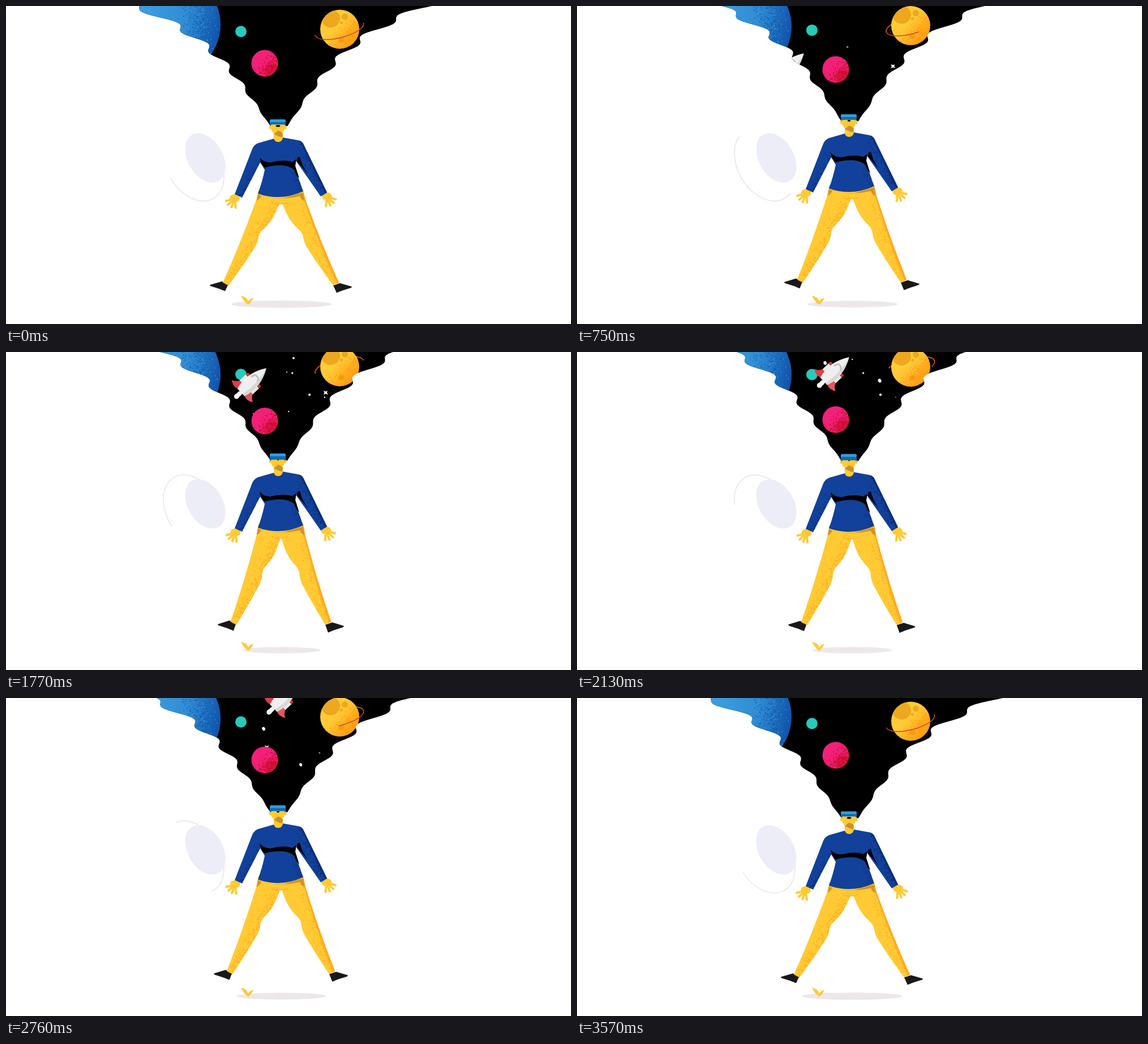
These frames come from a looping animation (998 by 561 pixels, 3600 ms). An HTML page with a canvas:

```html
<!DOCTYPE html>
<html lang="en">
<head>
<meta charset="utf-8">
<title>Space dreamer</title>
<style>
html, body { margin: 0; width: 100%; height: 100%; overflow: hidden; background: #fff; }
canvas { display: block; }
</style>
</head>
<body>
<canvas id="stage" width="998" height="561"></canvas>
<script>
const ctx = document.getElementById('stage').getContext('2d');
const LOOP = 3600, TAU = Math.PI * 2;
const SKIN = '#ffca33';

function random(seed) {
  return () => (seed = (seed * 16807) % 2147483647) / 2147483647;
}

function oval(x, y, rx, ry, color, turn = 0) {
  ctx.beginPath();
  ctx.ellipse(x, y, rx, ry, turn, 0, TAU);
  ctx.fillStyle = color;
  ctx.fill();
}

function shape(d, color) {
  ctx.fillStyle = color;
  ctx.fill(new Path2D(d));
}

function line(d, width, color) {
  ctx.lineWidth = width;
  ctx.strokeStyle = color;
  ctx.stroke(new Path2D(d));
}

// Run a drawing inside its own transform and clip
function group(paint) {
  ctx.save();
  paint();
  ctx.restore();
}

// Speckles scattered around a straight line
function grain(x0, y0, x1, y1, spread, count, color, seed = 7) {
  const rnd = random(seed);
  ctx.fillStyle = color;
  for (let i = 0; i < count; i++) {
    const k = rnd();
    ctx.fillRect(x0 + (x1 - x0) * k + (rnd() + rnd() - 1) * spread,
      y0 + (y1 - y0) * k + (rnd() + rnd() - 1) * spread, 1.6, 1.6);
  }
}

function gradient(x0, y0, x1, y1, ...stops) {
  const g = ctx.createLinearGradient(x0, y0, x1, y1);
  stops.forEach((c, i) => g.addColorStop(i / (stops.length - 1), c));
  return g;
}

function planet(x, y, r, fill, detail) {
  group(() => {
    ctx.translate(x, y);
    oval(0, 0, r, r, fill);
    ctx.clip();
    detail();
  });
}

// Half of an ellipse ending at angle lead, limited to the window low..high
function orbit(x, y, rx, ry, tilt, lead, low, high, color) {
  ctx.strokeStyle = color;
  ctx.lineWidth = 1.5;
  for (const turn of [-TAU, 0, TAU]) {
    const a = Math.max(low, lead - Math.PI + turn), b = Math.min(high, lead + turn);
    if (a >= b) continue;
    ctx.beginPath();
    ctx.ellipse(x, y, rx, ry, tilt, a, b);
    ctx.stroke();
  }
}

// Half width of the plume at height h above the head: a flare with growing waves
function flare(h, top, wavelength, phase) {
  const wave = 0.067 * h * Math.sin(TAU * (h / wavelength - phase));
  return 0.67 * h + top * (h / 212) ** 4 + wave;
}

function plume(u, loops) {
  const base = 212 - 20.5 * u;
  ctx.beginPath();
  for (let h = 240; h >= 0; h -= 3)
    ctx.lineTo(467 - flare(h, 97, 36, 0.306 + 2 * loops), base - h);
  for (let h = 0; h <= 240; h += 3)
    ctx.lineTo(497 + flare(h, 104, 37.5, 0.537 - 0.27 * u), base - h);
  ctx.closePath();
}

function drawStars(t) {
  const rnd = random(4242);
  for (let i = 0; i < 30; i++) {
    const x = 400 + 165 * rnd(), y = 5 + 125 * rnd(), r = 1 + 2 * rnd() ** 2;
    const from = 350 + 2300 * rnd(), to = from + 500 + 430 * rnd();
    if (t < from || t > to) continue;
    ctx.globalAlpha = Math.min(1, (t - from) / 90, (to - t) / 90);
    if (i % 7) oval(x, y, r, r > 2.3 ? r * 1.25 : r, '#fff', -0.4);
    else shape(`M${x - 4} ${y - 3}l4 1.5 3-1.5-1 3.5 2 3.5-4-1.5-4 1.5 1.5-3.5Z`, '#fff');
  }
  ctx.globalAlpha = 1;
}

function drawRocket(t) {
  group(() => {
    ctx.translate(433 + 0.058 * (t - 1770), 54 - 0.054 * (t - 1770));
    ctx.rotate(-0.76);
    oval(-35, 0, 5, 4.5, '#fff');
    oval(-29, 0, 7, 4, '#f4f4f4');
    for (const side of [-1, 1]) group(() => {
      ctx.scale(1, side);
      shape('M-4 14Q-18 17-22 27Q-29 16-24 8L-14 9Z', side < 0 ? '#dd3d45' : '#e2585a');
      shape('M-12 11H3V17H-12Z', '#e9e9e9');
      shape('M3 11H7Q10 14 7 17H3Z', '#d92f3c');
    });
    shape('M-25-9Q6-19 37 0Q6 19-25 9Z', '#efefef');
    shape('M-25 4Q8 10 37 0Q6 19-25 9Z', '#d8d8d8');
    line('M8-7Q16-6 15 0Q14 5 10 6', 3, '#c2c2c4');
  });
}

function drawSpace(t, u) {
  const loops = t / LOOP, spin = TAU * loops;
  group(() => {
    plume(u, loops);
    ctx.fillStyle = '#000';
    ctx.fill();
    ctx.clip();
    drawStars(t);

    planet(290, 33 + 7 * u, 89, gradient(-40, 0, 89, 25, '#3b9cde', '#2f8bd3', '#0d50a8'), () => {
      grain(45, -60, 65, 70, 40, 400, '#1159ae');
      grain(20, -40, 58, 40, 50, 180, '#3c98da', 31);
    });
    planet(415, 45 - 5.5 * u, 10, '#26cbbb', () => {});
    const bob = 20.5 * (u + 0.11 * Math.sin(spin));
    planet(457, 101 + bob, 23.5, '#f3207a', () => {
      oval(17, 17, 16, 16, '#e0164f');
      grain(-6, 24, 24, -6, 19, 330, '#c90d2c');
    });

    const y = 41 - 15 * u;
    const ring = (low, high) =>
      orbit(589, y, 44, 15, -0.25, spin + Math.PI, low, high, '#cf4a33');
    ring(-Math.PI, 0);
    ring(Math.PI, TAU);
    planet(589.5, y, 34.5, gradient(-5, -8, 28, 24, '#ffcb38', '#ffb423', '#ff980c'), () => {
      grain(-5, 34, 32, -10, 17, 190, '#ff9d14');
      oval(-16, -19, 16.5, 16, '#eda81f');
      oval(9, -22, 5.5, 5.5, '#eda81f');
      oval(3, -12, 2.5, 2.5, '#eda81f');
      oval(3, 19, 5, 5, '#f59a18');
    });
    ring(0, Math.PI);
    drawRocket(t);
  });
}

const leg = new Path2D('M446 326L441 345Q412 424 383 488L393 493Q421 455 440 425' +
  'Q445 416 446 408Q447 401 453 395Q467 383 475 367L483 349H487V326Z');

function drawLegs(u) {
  for (const side of [1, -1]) group(() => {
    // the hip rides with the body while the foot swings inwards
    const swing = 13.5 * u / 157, lift = 9 * u / 157;
    if (side < 0) ctx.transform(-1, 0, 0, 1, 971, 0);
    ctx.transform(1, 0, swing, 1 + lift, -331 * swing, -21 * u - 331 * lift);
    group(() => {
      if (side < 0) ctx.translate(0, 3);
      shape('M360 492L381 486L393 490L387 503L377 499L361 494Z', '#191919');
    });
    ctx.fillStyle = SKIN;
    ctx.fill(leg);
    ctx.clip(leg);
    if (side > 0) {
      grain(484, 350, 446, 405, 18, 220, '#ffab22');
      grain(446, 405, 392, 492, 15, 200, '#ffab22', 11);
    } else {
      line('M444 330Q412 424 383 488', 9, '#ffab22');
      grain(440, 345, 383, 488, 20, 330, '#ffab22');
    }
  });
}

function drawHand(x, y, side) {
  group(() => {
    ctx.translate(x, y);
    ctx.scale(side, 1);
    oval(0, -1, 9, 7, SKIN);
    for (let i = 0; i < 4; i++) {
      const a = 2.9 - 0.48 * i;
      line(`M0 0L${16 * Math.cos(a)} ${16 * Math.sin(a)}`, 4, SKIN);
    }
  });
}

const shirt = new Path2D('M473 234L445 242Q438 245 435 252L404 332L417 338L449 276' +
  'L457 289Q453 309 445 331Q485 345 525 327L510 285L512 273L556 336L567 329' +
  'L525 243Q522 238 517 237L489 232Q481 245 473 234Z');

function drawBody(u) {
  // waistband and pockets
  shape('M446 325H525L527 334Q500 343 470 341L445 334Z', SKIN);
  shape('M490 339L525 329L526 333Q508 340 470 340Z', '#cf922c');
  shape('M445 332L451 335Q448 341 443 344Z', '#d4912b');
  shape('M519 335L525 331L527 344Q520 341 519 335Z', '#d4912b');
  line('M470 348Q481 352 498 347', 1, '#f5ae25');

  drawHand(404 + 1.5 * u, 340, 1);
  drawHand(567 - 1.5 * u, 337, -1);

  group(() => {
    ctx.fillStyle = '#12419b';
    ctx.fill(shirt);
    ctx.clip(shirt);
    line('M524 238L568 330', 9, '#0e3180');
    grain(520, 240, 564, 332, 14, 150, '#0b2a70');
    grain(446, 276, 412, 340, 9, 90, '#0c2f7c');
    grain(512, 285, 520, 328, 12, 60, '#0c2f7c');
  });
  shape('M448 267Q454 276 468 276Q488 270 506 275L513 270L511 282L518 304' +
    'Q511 297 509 289Q499 281 485 281Q469 281 457 285Q449 278 448 267Z', '#000');
  shape('M515 267L519 266Q522 280 533 296L514 274Z', '#000');

  // neck, face and visor
  shape('M473 220H489V233Q487 240 481 240Q474 240 473 233Z', SKIN);
  oval(467, 214, 2, 3.5, SKIN);
  oval(493.5, 214, 2, 3.5, SKIN);
  shape('M467 207H494L491 220L486 227H475L469 220Z', SKIN);
  shape('M473 226L480 220Q487 221 489 226L488 232Q480 230 473 226Z', '#cc9030');
  const brow = 209 + 2 * u;
  shape(`M466 202H494V${brow + 2}L491 ${brow}H470L466 ${brow + 2}Z`, '#1268b5');
  shape('M468 200H492Q494 200 494 202V205H466V202Q466 200 468 200Z', '#2a9fdd');
  oval(480.5, 211.5, 4 - 2.8 * u, 1.8 - 0.8 * u, '#160d08');
}

function draw(t) {
  // u: 0 at the lowest pose, 1 at the highest
  const p = 1 - Math.abs(1 - 2 * t / LOOP);
  const u = (1 - Math.cos(Math.PI * p)) / 2 + 0.06 * Math.sin(Math.PI * p);
  ctx.fillStyle = '#fff';
  ctx.fillRect(0, 0, 998, 561);
  ctx.lineCap = 'round';

  const lead = TAU * t / LOOP + Math.PI / 2;
  orbit(331.5, 280.5, 68.5, 47, 1.03, lead, -TAU, TAU, '#e9e9f0');
  oval(352, 268, 47, 31, '#ecedf7', Math.PI / 3);

  oval(486.5, 526, 88.5 - 19.5 * u, 6.5 - u, '#ece7e9');
  shape('M415 511Q425 513 428 521Q431 516 437 515Q434 522 428 527Q420 522 415 511Z', SKIN);

  drawSpace(t, u);
  drawLegs(u);
  group(() => {
    ctx.translate(0, -21 * u);
    drawBody(u);
  });
}

function tick() {
  draw(performance.now() % LOOP);
  requestAnimationFrame(tick);
}
tick();
</script>
</body>
</html>
```
